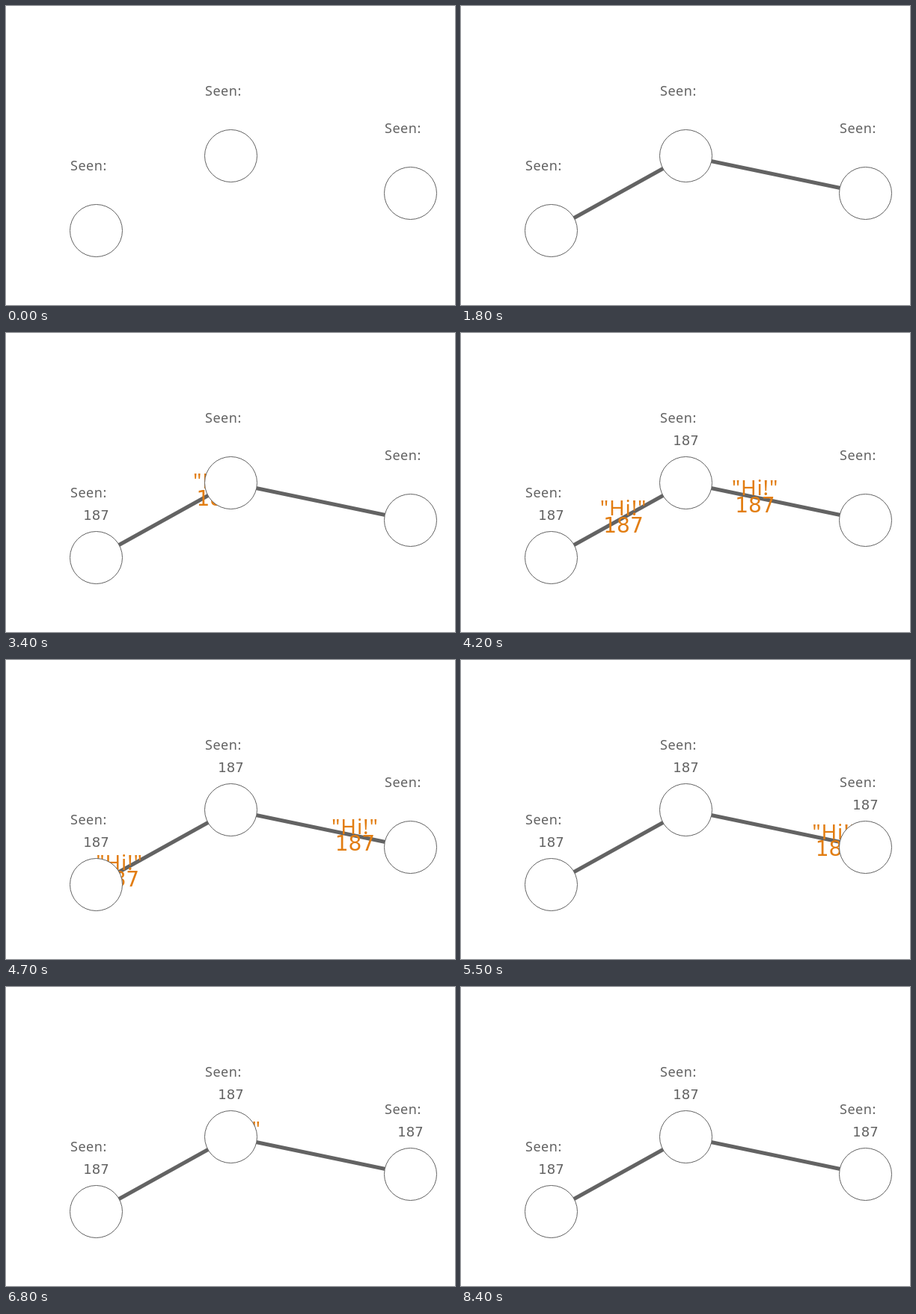
An HTML page with a canvas that plays this animation: 600x400 px, repeating every 8.5 s.

```html
<!DOCTYPE html>
<html lang="en">
<head>
<meta charset="utf-8">
<title>Message passing</title>
<style>
html, body { margin: 0; width: 100%; height: 100%; overflow: hidden; background: #fff; }
canvas { display: block; }
</style>
</head>
<body>
<canvas id="stage" width="600" height="400"></canvas>
<script>
const ctx = document.getElementById('stage').getContext('2d');
const LOOP = 8500, STEP = 100, FADE = 1800, SPEED = 0.15, RADIUS = 35;
const GRAY = '#636363', ORANGE = '#e27d11';
const LETTERS = '"Noto Sans", "Open Sans", sans-serif';
const DIGITS = '"DejaVu Sans", sans-serif';

// seen: moment the node first shows its number
const a = { x: 120, y: 300, seen: 2170 };
const b = { x: 300, y: 200, seen: 3567 };
const c = { x: 540, y: 250, seen: 5231 };
const nodes = [a, b, c];
const links = [[a, b], [b, c]];
const hops = [[a, b], [b, a], [b, c], [c, b]];

function write(text, x, y, size, family, color, align = 'center') {
  ctx.font = `${size}px ${family}`;
  ctx.letterSpacing = family === LETTERS ? `${size * 0.03}px` : '0px';
  ctx.textAlign = align;
  ctx.fillStyle = color;
  ctx.fillText(text, x, y);
}

function drawLink([from, to], alpha) {
  ctx.globalAlpha = alpha;
  ctx.strokeStyle = GRAY;
  ctx.lineWidth = 5;
  ctx.beginPath();
  ctx.moveTo(from.x + 0.5, from.y + 0.5);
  ctx.lineTo(to.x + 0.5, to.y + 0.5);
  ctx.stroke();
  ctx.globalAlpha = 1;
}

function drawMessage([from, to], t) {
  const dx = to.x - from.x, dy = to.y - from.y;
  const p = (t - from.seen) * SPEED / Math.hypot(dx, dy);
  if (p < 0 || p > 1) return;
  const x = from.x + dx * p, y = from.y + dy * p;
  write('"Hi!"', x, y - 2, 28, LETTERS, ORANGE);
  write('187', x, y + 20.5, 28, DIGITS, ORANGE);
}

function drawNode({ x, y, seen }, t) {
  ctx.beginPath();
  ctx.arc(x + 0.5, y + 0.5, RADIUS, 0, Math.PI * 2);
  ctx.fillStyle = '#fff';
  ctx.fill();
  ctx.strokeStyle = GRAY;
  ctx.lineWidth = 1;
  ctx.stroke();
  write('Seen:', x - 34, y - 80, 18, LETTERS, GRAY, 'left');
  if (t >= seen) write('187', x + 0.5, y - 50, 18, DIGITS, GRAY);
}

function draw(t) {
  ctx.fillStyle = '#fff';
  ctx.fillRect(0, 0, 600, 400);
  links.forEach(link => drawLink(link, Math.min(1, t / FADE)));
  hops.forEach(hop => drawMessage(hop, t));
  nodes.forEach(node => drawNode(node, t));
}

const start = performance.now();
function tick() {
  const t = (performance.now() - start) % LOOP;
  draw(Math.floor(t / STEP) * STEP);
  requestAnimationFrame(tick);
}
tick();
</script>
</body>
</html>
```
